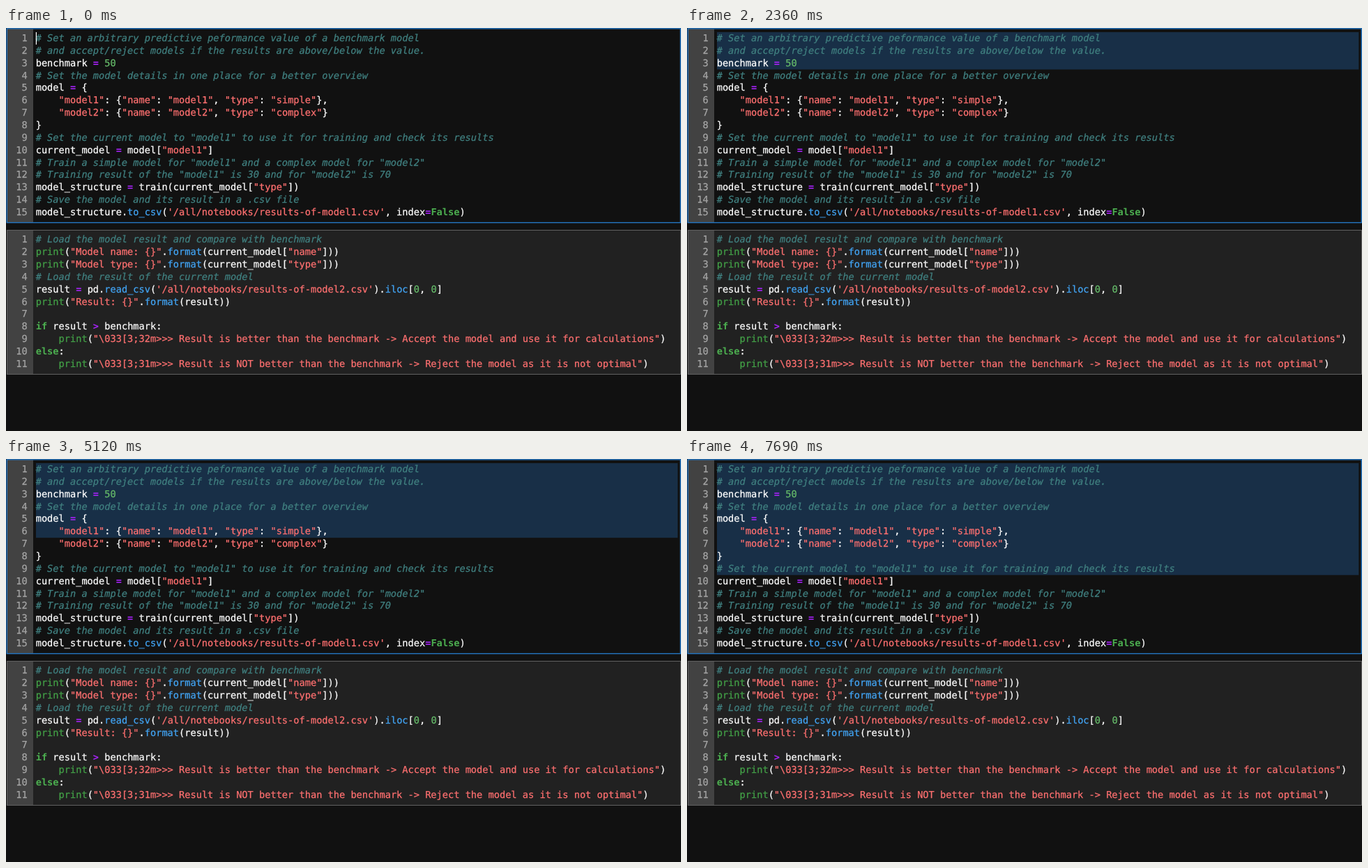
Recreate the animation shown at these times as an HTML page. Size 968x579 px, loop 8 s.

```html
<!DOCTYPE html>
<html lang="en">
<head>
<meta charset="utf-8">
<title>Notebook cells</title>
<style>
  html, body { margin: 0; width: 100%; height: 100%; overflow: hidden; background: #111; }
  svg { display: block; width: 968px; height: 579px; }
  text {
    font: 13.655px "DejaVu Sans Mono", "Liberation Mono", monospace;
    white-space: pre;
    text-rendering: geometricPrecision;
    color: #fff;
  }
  text, tspan { fill: currentColor; stroke: currentColor; stroke-width: 0.25px; }
  .no { color: #a6a6a6; text-anchor: end; }
  .comment { color: #408080; font-style: italic; }
  .string { color: #ff7070; }
  .prop { color: #42a5f5; }
  .keyword { color: #4caf50; font-weight: bold; stroke: none; }
  .builtin { color: #43a047; }
  .number { color: #66bb6a; }
  .op { color: #a2f; font-weight: bold; stroke: none; }

  #selection { fill: #182f47; --line: 17.857px; animation: select 8s step-end infinite; }
  #caret { fill: #fff; animation: caret 8s step-end infinite; }
  @keyframes select {
    0% { height: 0; }
    6% { height: var(--line); }
    17.625% { height: calc(2 * var(--line)); }
    29.5% { height: calc(3 * var(--line)); }
    42.25% { height: calc(4 * var(--line)); }
    52.75% { height: calc(5 * var(--line)); }
    64% { height: calc(6 * var(--line)); }
    75.25% { height: calc(7 * var(--line)); }
    84.875% { height: calc(8 * var(--line)); }
    96.125%, 100% { height: calc(9 * var(--line)); }
  }
  @keyframes caret {
    0% { opacity: 1; }
    6%, 100% { opacity: 0; }
  }
</style>
</head>
<body>
<svg viewBox="0 0 968 579">
  <rect x="1.3" y="0.9" width="966" height="278.7" fill="#111"/>
  <rect x="2" y="1" width="37" height="278" fill="#424242"/>
  <rect x="1.3" y="0.9" width="966" height="278.7" fill="none" stroke="#2577c4" stroke-width="1.4"/>
  <rect x="1.5" y="290.5" width="966" height="207" fill="#212121" stroke="#616161"/>
  <rect x="2" y="291" width="37" height="206" fill="#424242"/>
  <rect id="selection" x="43" y="6" width="920.3" height="0"/>
  <g id="code"></g>
  <rect id="caret" x="42.8" y="6" width="1.2" height="17.8"/>
</svg>
<script>
const LINE = 17.857, BASELINE = 13.05;
const code = document.getElementById("code");

const setup = String.raw`# Set an arbitrary predictive peformance value of a benchmark model
# and accept/reject models if the results are above/below the value.
benchmark = 50
# Set the model details in one place for a better overview
model = {
    "model1": {"name": "model1", "type": "simple"},
    "model2": {"name": "model2", "type": "complex"}
}
# Set the current model to "model1" to use it for training and check its results
current_model = model["model1"]
# Train a simple model for "model1" and a complex model for "model2"
# Training result of the "model1" is 30 and for "model2" is 70
model_structure = train(current_model["type"])
# Save the model and its result in a .csv file
model_structure.to_csv('/all/notebooks/results-of-model1.csv', index=False)`;

const check = String.raw`# Load the model result and compare with benchmark
print("Model name: {}".format(current_model["name"]))
print("Model type: {}".format(current_model["type"]))
# Load the result of the current model
result = pd.read_csv('/all/notebooks/results-of-model2.csv').iloc[0, 0]
print("Result: {}".format(result))

if result > benchmark:
    print("\033[3;32m>>> Result is better than the benchmark -> Accept the model and use it for calculations")
else:
    print("\033[3;31m>>> Result is NOT better than the benchmark -> Reject the model as it is not optimal")`;

const TOKEN = new RegExp([
  /(?<comment>#.*)/,
  /(?<string>"[^"]*"|'[^']*')/,
  /(?<prop>(?<=\.)\w+)/,
  /(?<keyword>\b(?:if|else|False)\b)/,
  /(?<builtin>\bprint\b)/,
  /(?<number>\b\d+\b)/,
  /(?<op>[=>])/,
  /\w+|[^\w#"'=>]/
].map(r => r.source).join("|"), "g");

function add(parent, tag, attrs, text) {
  const el = document.createElementNS("http://www.w3.org/2000/svg", tag);
  for (const name in attrs) el.setAttribute(name, attrs[name]);
  if (text) el.textContent = text;
  return parent.appendChild(el);
}

function drawCell(source, top) {
  source.split("\n").forEach((line, i) => {
    const y = top + i * LINE + BASELINE;
    add(code, "text", { class: "no", x: 30.8, y }, String(i + 1));
    const row = add(code, "text", { x: 42.7, y });
    for (const m of line.matchAll(TOKEN)) {
      const kind = Object.keys(m.groups).find(k => m.groups[k]);
      add(row, "tspan", kind ? { class: kind } : {}, m[0]);
    }
  });
}

drawCell(setup, 6);
drawCell(check, 295.3);
</script>
</body>
</html>
```
